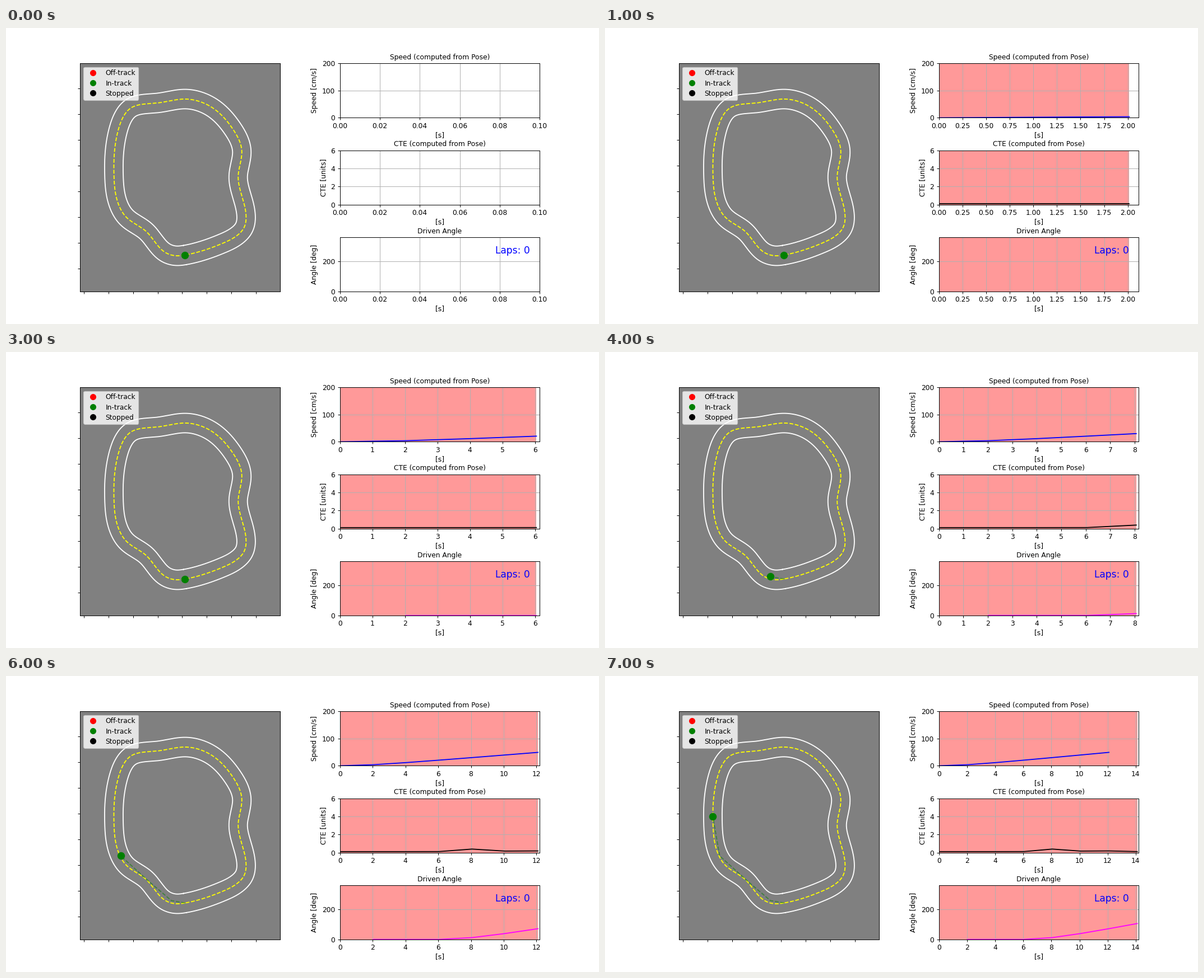
Write a matplotlib script that moves like this. It is 1058 px wide and 529 px high and loops after 8 s.

```python
import matplotlib.pyplot as plt
import numpy as np
from matplotlib.animation import FuncAnimation
from matplotlib.lines import Line2D

plt.rcParams["font.family"] = "DejaVu Sans"

WIDTH, HEIGHT, DPI = 1058, 529, 88
N_FRAMES = 8
STEP = 2.016  # seconds of driving per frame
START = 3 * STEP  # the car stands still until then
UNIT = np.array([43.75, 46.1])  # pixels per track unit
HALF_LANE = 0.377  # track units

# Key points of the centre line, in driving order
CENTER = np.array([
    (319.3, 405.7), (303, 407), (284, 401), (250, 363.5), (215, 338.5),
    (198, 307), (192.6, 262), (198.8, 188), (222, 143.5), (270, 134),
    (321, 127), (366, 141), (404, 179.5), (420.7, 220), (414.3, 264),
    (425, 315), (424, 358), (410, 372.5), (386, 385),
])


def closed_spline(points, samples=40):
    """Periodic cubic spline with chord-length parameter."""
    n = len(points)
    following = np.roll(points, -1, axis=0)
    h = np.hypot(*(following - points).T)
    slope = (following - points) / h[:, None]
    system, rhs = np.zeros((n, n)), np.zeros((n, 2))
    for i in range(n):
        system[i, i - 1] = h[i]
        system[i, i] = 2 * (h[i] + h[i - 1])
        system[i, (i + 1) % n] = h[i - 1]
        rhs[i] = 3 * (h[i] * slope[i - 1] + h[i - 1] * slope[i])
    tangent = np.linalg.solve(system, rhs)
    u = np.linspace(0, 1, samples, endpoint=False)[:, None]
    return np.vstack([
        (1 + 2 * u) * (1 - u) ** 2 * points[i]
        + u * (1 - u) ** 2 * h[i] * tangent[i]
        + u ** 2 * (3 - 2 * u) * following[i]
        + u ** 2 * (u - 1) * h[i] * tangent[(i + 1) % n]
        for i in range(n)
    ])


def close(curve):
    return np.vstack([curve, curve[:1]])


def normals(curve):
    """Unit normals, pointing to the inside of the loop."""
    direction = np.roll(curve, -1, axis=0) - np.roll(curve, 1, axis=0)
    normal = np.column_stack([-direction[:, 1], direction[:, 0]])
    return normal / np.hypot(*normal.T)[:, None]


def ramp(t, slope, ease):
    """Soft start that settles into a straight climb."""
    return slope * (np.hypot(t, ease) - ease)


def bump(t, middle, width):
    return np.exp(-((t - middle) / width) ** 2)


# Telemetry, one sample per frame
times = STEP * np.arange(N_FRAMES)
driving = np.maximum(times - START, 0)
speed = ramp(times, 4.9, 2.2)
speed[-1] = np.nan  # the newest reading drops out
cte = 0.11 + 0.28 * bump(times, 4 * STEP, 1) + 0.1 * bump(times, 11.3, 1.5)
angle = ramp(driving, 18.2, 2.7)
angle[0] = np.nan

# The car follows the centre line and drifts inwards with the cross-track error
center = closed_spline(CENTER / UNIT)
inward = normals(center)
path = center * UNIT
travelled = np.concatenate([[0], np.cumsum(np.hypot(*np.diff(path, axis=0).T))])
distance = ramp(driving, 38.4, 2.7)
drift = 15 * (cte - 0.11)
car_path = np.column_stack([
    np.interp(distance, travelled, path[:, k])
    + drift * np.interp(distance, travelled, inward[:, k])
    for k in (0, 1)
])

# A hair over the exact size, so that truncation keeps the full pixel count
fig = plt.figure(figsize=((WIDTH + 0.01) / DPI, (HEIGHT + 0.01) / DPI), dpi=DPI, facecolor="white")
outer_grid = fig.add_gridspec(1, 2, left=0.125, right=0.9, bottom=0.11, top=0.88, wspace=0.3)

# Track map, in stage pixels
track = fig.add_subplot(outer_grid[0], facecolor="gray")
box = track.get_position()
track.set_xlim(box.x0 * WIDTH, box.x1 * WIDTH)
track.set_ylim((1 - box.y0) * HEIGHT, (1 - box.y1) * HEIGHT)
track.set_xticks(139.3 + UNIT[0] * np.arange(8), [""] * 8)
track.set_yticks(107.8 + UNIT[1] * np.arange(8), [""] * 8)

for side in (-1, 1):
    edge = (center + side * HALF_LANE * inward) * UNIT
    track.plot(*close(edge).T, color="white")
track.plot(*close(path).T, color="yellow", ls="--")
trail, = track.plot([], [], color="green", ls="--", alpha=0.5)
car, = track.plot([], [], "o", color="green", ms=10)
track.legend(
    handles=[
        Line2D([], [], ls="", marker="o", ms=8, color=color, label=label)
        for color, label in (("red", "Off-track"), ("green", "In-track"), ("black", "Stopped"))
    ],
    loc="upper left", labelspacing=0.42,
)

# Telemetry charts
CHARTS = [
    ("Speed (computed from Pose)", "Speed [cm/s]", 200, "blue", speed),
    ("CTE (computed from Pose)", "CTE [units]", 6, "black", cte),
    ("Driven Angle", "Angle [deg]", 360, "magenta", angle),
]
charts = []
chart_grid = outer_grid[1].subgridspec(3, 1, hspace=0.6)
for cell, (title, ylabel, top, color, values) in zip(chart_grid, CHARTS):
    ax = fig.add_subplot(cell)
    ax.set_title(title, fontsize=10)
    ax.set_xlabel("[s]", labelpad=2.5)
    ax.set_ylabel(ylabel, labelpad=5.5)
    ax.set_ylim(0, top)
    ax.grid(True)
    span = ax.axvspan(0, 0, facecolor="red", alpha=0.4, lw=0)
    line, = ax.plot([], [], color=color)
    charts.append((ax, span, line, values))
ax.text(0.95, 0.75, "Laps: 0", transform=ax.transAxes, color="blue",
        fontsize=14, ha="right", va="center")


def update(frame):
    shown = slice(0, frame + 1)
    trail.set_data(*car_path[shown].T)
    car.set_data(*car_path[frame:frame + 1].T)
    for ax, span, line, values in charts:
        ax.set_xlim(0, times[frame] + 0.1)
        span.set_width(times[frame])
        line.set_data(times[shown], values[shown])


anim = FuncAnimation(fig, update, frames=N_FRAMES, interval=1000, repeat=True, repeat_delay=0)
plt.show()
```
